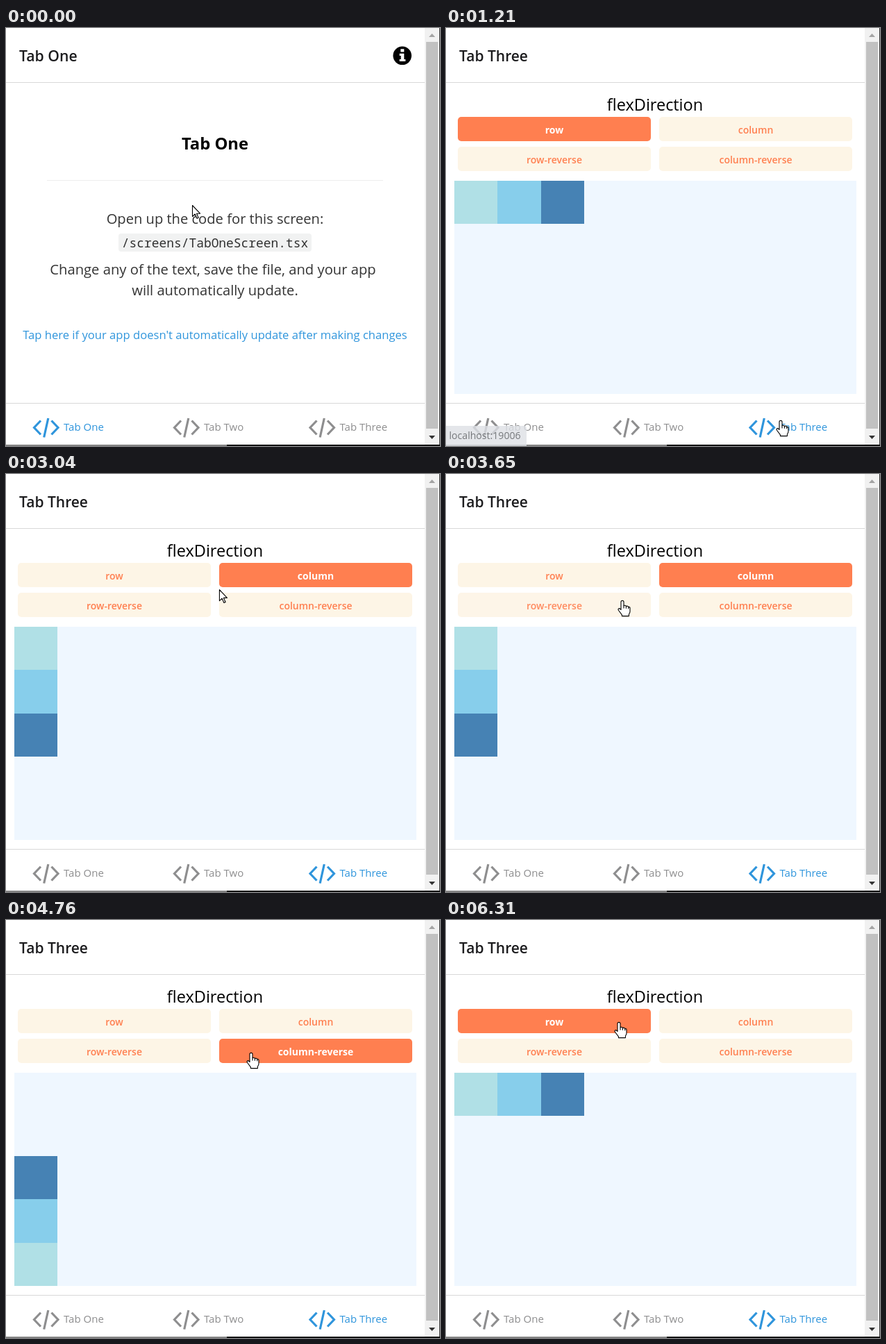
Recreate the animation shown at these times as an HTML page. Size 625x602 px, loop 7420 ms.

```html
<!DOCTYPE html>
<html lang="en">
<head>
<meta charset="utf-8">
<title>flexDirection demo</title>
<style>
  html, body { margin: 0; width: 100%; height: 100%; overflow: hidden; background: #fff; }
  svg { display: block; width: 625px; height: 602px; }
  text { font-family: "Open Sans", "Noto Sans", sans-serif; }
  .mono { font-family: "Noto Sans Mono", "Liberation Mono", monospace; }
</style>
</head>
<body>
<svg id="stage" viewBox="0 0 625 602"></svg>
<script>
const LOOP = 7420;
const BLUE = '#2f95dc', GRAY = '#8e8e8f', CORAL = '#ff7f50', CREAM = '#fdf5e6';
const SCREEN_SWITCH = 1090;

const buttons = [
  { label: 'row', x: 17, y: 128 },
  { label: 'column', x: 307, y: 128 },
  { label: 'row-reverse', x: 17, y: 171 },
  { label: 'column-reverse', x: 307, y: 171 }
];
const presses = [
  { at: 2610, button: 1 },
  { at: 3620, button: 2 },
  { at: 4390, button: 3 },
  { at: 5940, button: 0 }
];
const HOLD = 110, FADE_DOWN = 150, FADE_UP = 250;

// Pointer hotspot travel; bend bows the path downwards.
const moves = [
  { start: 270, end: 1010, from: [268, 255], to: [482, 565] },
  { start: 1450, end: 2200, from: [482, 565], to: [368, 148] },
  { start: 2690, end: 3360, from: [368, 148], to: [254, 182] },
  { start: 4020, end: 4350, from: [254, 182], to: [353, 191] },
  { start: 5130, end: 5860, from: [353, 191], to: [249, 147], bend: 5 }
];

const clamp = v => Math.max(0, Math.min(1, v));
const ease = v => { v = clamp(v); return v * v * (3 - 2 * v); };

const rect = (x, y, w, h, fill, r = 0) =>
  `<rect x="${x}" y="${y}" width="${w}" height="${h}" rx="${r}" fill="${fill}"/>`;
const text = (str, x, y, size, fill, { weight = 400, anchor = 'start', cls = '' } = {}) =>
  `<text x="${x}" y="${y}" font-size="${size}" fill="${fill}" font-weight="${weight}" text-anchor="${anchor}" class="${cls}">${str}</text>`;
const centered = (str, y, size, fill, extra) =>
  text(str, 301, y, size, fill, { anchor: 'middle', ...extra });

function pointerAt(t) {
  const move = moves.filter(m => m.start <= t).pop() || moves[0];
  const p = ease((t - move.start) / (move.end - move.start));
  const [x, y] = move.from.map((v, i) => v + (move.to[i] - v) * p);
  return { x, y: y + (move.bend || 0) * Math.sin(Math.PI * p) };
}

function pressOpacity(dt) {
  if (dt < 0) return 1;
  const down = d => 1 - 0.8 * ease(d / FADE_DOWN);
  if (dt < HOLD) return down(dt);
  const low = down(HOLD);
  return low + (1 - low) * ease((dt - HOLD) / FADE_UP);
}

function isClickable({ x, y }, onThird) {
  if (y > 541) return true;
  if (!onThird) return y > 431 && y < 453 && x > 25 && x < 578;
  return buttons.some(b => x >= b.x && x <= b.x + 278 && y >= b.y && y <= b.y + 35);
}

function tabOne() {
  const soft = 'rgba(0,0,0,.8)';
  return text('Tab One', 19, 48, 21.2, '#1c1c1e', { weight: 600 }) +
    `<circle cx="570.7" cy="39.8" r="13.3"/>
     <path d="M568.3 30.3h5v4.2h-5zM566.7 36.7h6.6v8.2h2v3.2h-8.6v-3.2h2v-5h-2z" fill="#fff"/>` +
    centered('Tab One', 175, 23.8, '#000', { weight: 700 }) +
    rect(59, 219, 484, 1, '#eee') +
    centered('Open up the code for this screen:', 282, 20.15, soft) +
    rect(162, 296, 278, 26, '#f1f2f2', 4) +
    centered('/screens/TabOneScreen.tsx', 316, 17.9, soft, { cls: 'mono' }) +
    text('Change any of the text, save the file, and your app', 298, 355, 20.2, soft, { anchor: 'middle' }) +
    centered('will automatically update.', 385, 20.15, soft) +
    centered('Tap here if your app doesn\'t automatically update after making changes', 448, 16.6, BLUE);
}

function tabThree(t) {
  const press = presses.filter(p => p.at <= t).pop();
  const selected = (presses.filter(p => p.at + HOLD <= t).pop() || { button: 0 }).button;
  const buttonMarkup = buttons.map((b, i) => {
    const active = i === selected;
    const opacity = press && press.button === i ? pressOpacity(t - press.at) : 1;
    return `<g opacity="${opacity.toFixed(3)}">` +
      rect(b.x, b.y, 278, 35, active ? CORAL : CREAM, 5) +
      text(b.label, b.x + 139, b.y + 24, 14, active ? '#fff' : CORAL,
        { weight: active ? 700 : 600, anchor: 'middle' }) + '</g>';
  }).join('');

  const size = 62.4;
  const isColumn = selected % 2 === 1, isReverse = selected > 1;
  const length = isColumn ? 307 : 578.6;
  const boxes = ['powderblue', 'skyblue', 'steelblue'].map((color, i) => {
    const offset = isReverse ? length - size * (i + 1) : size * i;
    return rect(12 + (isColumn ? 0 : offset), 220 + (isColumn ? offset : 0), size, size, color);
  }).join('');

  return text('Tab Three', 19, 48, 21, '#1c1c1e', { weight: 600 }) +
    centered('flexDirection', 119, 23.5, '#000') + buttonMarkup +
    rect(12, 220, 579, 307, '#eff7ff') +
    `<g shape-rendering="crispEdges">${boxes}</g>`;
}

function tabBar(activeIndex) {
  return [['Tab One', 38.5], ['Tab Two', 240.5], ['Tab Three', 436]].map(([label, x], i) => {
    const color = i === activeIndex ? BLUE : GRAY;
    return `<path transform="translate(${x} 561)" fill="none" stroke="${color}" stroke-width="3.2"
      d="M11.5 4.5L2 14.5L11.5 24.5M22.3 1L16.2 28.5M27 4.5L36.5 14.5L27 24.5"/>` +
      text(label, x + 44.5, 580, 15, color);
  }).join('');
}

function statusBubble(opacity) {
  if (opacity <= 0) return '';
  return `<g opacity="${opacity.toFixed(3)}">
    <path d="M0 573H112q4 0 4 4V602H0z" fill="#dee1e6"/>` +
    text('localhost:19006', 4.5, 592, 14.1, '#55585c') + '</g>';
}

const windowFrame =
  rect(0, 78, 603, 1, '#d8d8d8') + rect(0, 540, 603, 1, '#d8d8d8') +
  rect(603, 0, 21, 600, '#f1f1f1') + rect(605, 20, 17, 557, '#c1c1c1') +
  `<path d="M609 13h9l-4.5-5z" fill="#a3a3a3"/><path d="M609 587h9l-4.5 5z" fill="#333"/>` +
  rect(624, 0, 1, 602, '#333') +
  rect(0, 600, 318, 2, '#858585') + rect(318, 600, 307, 2, '#111');

function pointer(pos, clickable) {
  const shape = clickable
    ? `<path d="M-2 2.4a2 2 0 0 1 4 0V7.6q2.2-.9 3.4.8q2.1-.8 3.3 1q2.3-.3 2.3 2V16q0 2-1.6 4V22.6H-.6V20.8L-5.4 14.5q-1.2-2 .2-2.8q1.5-.6 3.2 1.8z"/>
       <path d="M2 7.6V11.5M5.4 8.4V11.8M8.7 9.4V12.2" fill="none"/>`
    : '<path d="M.5 .5V16.5L4.2 13L7 19.2L9.2 18.2L6.5 12.2H11.5z"/>';
  return `<g transform="translate(${pos.x.toFixed(1)} ${pos.y.toFixed(1)})" fill="#fff" stroke="#000" stroke-width="1.1" stroke-linejoin="round">${shape}</g>`;
}

const stage = document.getElementById('stage');
let shown = '';

function draw(t) {
  const onThird = t >= SCREEN_SWITCH;
  const pos = pointerAt(t);
  const bubble = t < 1450 ? clamp((t - 1050) / 200) : pos.y > 541 ? 1 : 0;
  const markup = (onThird ? tabThree(t) : tabOne()) + tabBar(onThird ? 2 : 0) +
    windowFrame + statusBubble(bubble) + pointer(pos, isClickable(pos, onThird));
  if (markup !== shown) stage.innerHTML = shown = markup;
}

const began = performance.now();
function tick() {
  draw((performance.now() - began) % LOOP);
  requestAnimationFrame(tick);
}
tick();
</script>
</body>
</html>
```
